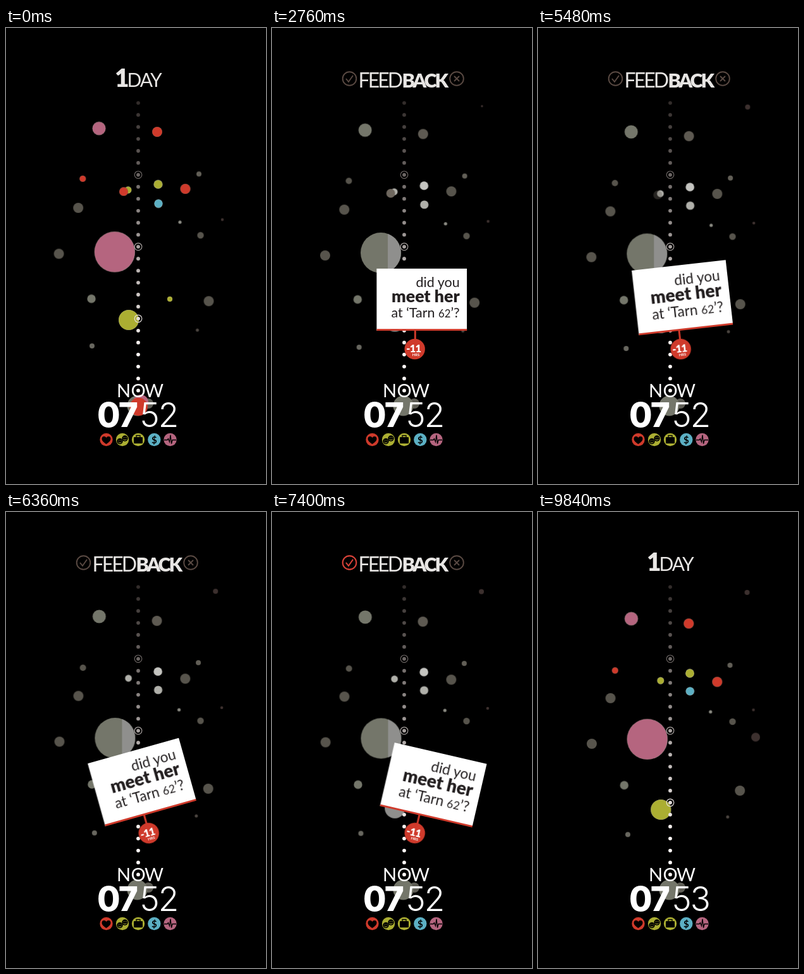
Write an HTML page that moves like this. It is 411 by 720 pixels and loops after 9.88 s.

```html
<!DOCTYPE html>
<html lang="en">
<head>
<meta charset="utf-8">
<title>1 Day</title>
<style>
html, body { margin: 0; width: 100%; height: 100%; overflow: hidden; background: #000; }
svg { display: block; width: 100%; height: 100%; }
text { font-family: Lato, "Open Sans", sans-serif; fill: #fff; }
.mid { text-anchor: middle; }
.light { font-weight: 300; }
.bold { font-weight: 700; }
.black { font-weight: 900; }
.title text { fill: #e8e6e4; }
.clock { font: 300 53px Inter, Roboto, sans-serif; letter-spacing: -2px; }
.clock.heavy { font-weight: 800; }
.card text { fill: #231f20; text-anchor: end; }
.mark { fill: none; stroke: #5a4a43; stroke-width: 1.9; }
.yes { stroke: #dc3d34; }

.anim, .drift, .tint { animation: 9.88s linear infinite; }
.drift { animation-name: drift; }
.tint { animation-name: tint; }
.cool { animation-name: cool; }
.day { animation-name: day; }
.feed { animation-name: feed; }
.glow { animation-name: glow; }
.yes { animation-name: yes; }
.pin, .stem, .tilt { transform-origin: 226px 507px; animation-timing-function: ease-in-out; }
.pin { animation-name: pin; }
.stem { animation-name: stem; }
.tilt { animation-name: tilt; }
.label { animation-name: label; }
.card { animation-name: card; transform-origin: 226px 478px; animation-timing-function: ease-in-out; }
.old { animation-name: old; animation-timing-function: step-end; }
.new { animation-name: new; animation-timing-function: step-end; }
.merge { animation-name: merge; }
.leave { animation-name: leave; }
.arrive { animation-name: arrive; }
.late { animation-name: late; }

@keyframes drift {
  from { transform: translate(var(--x0), var(--y0)); }
  to { transform: translate(var(--x1), var(--y1)); }
}
@keyframes tint { 0%, 9% { opacity: 1; } 21.5%, 80.5% { opacity: 0; } 85%, 100% { opacity: 1; } }
@keyframes cool { 0%, 9% { opacity: 1; } 18%, 100% { opacity: 0; } }
@keyframes day { 0%, 9% { opacity: 1; } 13%, 88% { opacity: 0; } 92%, 100% { opacity: 1; } }
@keyframes feed { 0%, 12% { opacity: 0; } 17%, 86% { opacity: 1; } 90%, 100% { opacity: 0; } }
@keyframes glow {
  0%, 8% { filter: drop-shadow(0 0 0 #cbb0a400); }
  13%, 19% { filter: drop-shadow(0 0 4px #cbb0a4); }
  28%, 86% { filter: drop-shadow(0 0 0 #cbb0a400); }
  91% { filter: drop-shadow(0 0 4px #cbb0a4); }
  98%, 100% { filter: drop-shadow(0 0 0 #cbb0a400); }
}
@keyframes yes { 0%, 67% { opacity: 0; } 70%, 100% { opacity: 1; } }
@keyframes pin {
  0%, 9% { transform: translate(-16px, 91px) scale(.88); }
  16%, 86% { transform: none; }
  91%, 100% { transform: scale(0); }
}
@keyframes label { 0%, 13% { opacity: 0; } 17%, 100% { opacity: 1; } }
@keyframes stem { 0%, 15% { transform: scaleY(0); } 19%, 82% { transform: none; } 88%, 100% { transform: scaleY(0); } }
@keyframes tilt {
  0%, 51% { transform: none; }
  61%, 64.5% { transform: rotate(-15.7deg); }
  72% { transform: rotate(14deg); }
  75% { transform: rotate(13deg); }
  81%, 100% { transform: none; }
}
@keyframes card { 0%, 22% { transform: scale(0); } 29%, 79% { transform: none; } 83%, 100% { transform: scale(0); } }
@keyframes old { 0% { opacity: 1; } 92%, 100% { opacity: 0; } }
@keyframes new { 0% { opacity: 0; } 92%, 100% { opacity: 1; } }
@keyframes merge { 0%, 44% { opacity: 1; } 62%, 100% { opacity: 0; } }
@keyframes leave { 0%, 20% { opacity: 1; } 34%, 100% { opacity: 0; } }
@keyframes arrive { 0%, 24% { transform: scale(0); } 33%, 100% { transform: none; } }
@keyframes late { 0%, 82% { transform: scale(0); } 92%, 100% { transform: none; } }
</style>
</head>
<body>
<svg viewBox="0 0 411 720" xmlns="http://www.w3.org/2000/svg">
  <g id="dots"></g>
  <g id="axis"></g>

  <g class="title">
    <g class="anim glow">
      <g class="anim day">
        <text class="black" x="172" y="93" font-size="39">1</text>
        <text x="191.500" y="93" font-size="30" letter-spacing="-2">DAY</text>
      </g>
      <g class="anim feed">
        <text x="136.500" y="93.500" font-size="32" letter-spacing="-2.900">FEED</text>
        <text class="black" x="205.500" y="93.500" font-size="30.500" letter-spacing="-3">BACK</text>
      </g>
    </g>
    <g class="anim feed">
      <g class="mark">
        <circle cx="122.500" cy="80" r="10.800"/><path d="M117 80l4 5 7-10"/>
        <circle cx="292" cy="80" r="10.800"/><path d="M288 76l8 8m0-8l-8 8"/>
      </g>
      <g class="mark anim yes"><circle cx="122.500" cy="80" r="10.800"/><path d="M117 80l4 5 7-10"/></g>
    </g>
  </g>

  <g class="anim tilt">
    <g class="anim pin">
      <rect class="anim stem" x="224.800" y="477" width="3" height="30" fill="#cf3a2b"/>
      <circle cx="225.700" cy="507" r="16.200" fill="#cf3a2b"/>
      <g class="anim label">
        <text class="mid black" x="223.800" y="511.800" font-size="16.500" letter-spacing="-.8">-11</text>
        <text class="mid bold" x="227.500" y="518.300" font-size="5.800">HRS</text>
      </g>
    </g>
    <g class="anim card">
      <rect x="162.500" y="375" width="149.500" height="103" fill="#fff"/>
      <rect x="162.500" y="475" width="149.500" height="3" fill="#cf3a2b"/>
      <text x="300" y="406" font-size="22.500">did you</text>
      <text class="black" x="300" y="431" font-size="28">meet her</text>
      <text x="300" y="456" font-size="22.500">at ‘Tarn <tspan font-size="17.500">62</tspan>’?</text>
    </g>
  </g>

  <g class="mid" font-size="29">
    <text x="186" y="583">N</text><text x="209" y="583">O</text><text x="234" y="583">W</text>
  </g>
  <text class="clock heavy" x="144" y="629.500">07</text>
  <text class="clock anim old" x="212" y="629.500">52</text>
  <text class="clock anim new" x="212" y="629.500">53</text>

  <g id="icons">
    <circle cx="158.500" cy="650" r="10.200" fill="#cf3a2b"/>
    <path d="M158.500 657c-4-3-7-5-7-8.500c0-4 5-5 7-1.500c2-3.500 7-2.500 7 1.500c0 3.500-3 5.500-7 8.500z"/>
    <circle cx="184" cy="650" r="10.200" fill="#abae32"/>
    <circle cx="180" cy="652.500" r="4.700"/><circle cx="188" cy="648" r="4.700"/>
    <g fill="none" stroke="#abae32">
      <path d="M177.500 653.500q2.500 3.500 5 0M178 651h1.200m2 0h1.200M185.500 649q2.500 3.500 5 0M186 646.500h1.200m2 0h1.200"/>
    </g>
    <circle cx="209" cy="650" r="10.200" fill="#abae32"/>
    <rect x="202" y="646" width="14" height="10" rx="1"/>
    <path d="M206 646v-2.500h6v2.500" fill="none" stroke="#000" stroke-width="1.300"/>
    <circle cx="234.300" cy="650" r="10.200" fill="#5cb0c4"/>
    <text class="mid bold" x="234.300" y="655.500" font-size="15" style="fill:#000">$</text>
    <circle cx="259.500" cy="650" r="10.200" fill="#b5657f"/>
    <path d="M250 650.500h5l1.500-2 2 5 1.500-11 1.500 14 1.500-6h6" fill="none" stroke="#000" stroke-width="1.300"/>
  </g>
</svg>
<script>
const NS = 'http://www.w3.org/2000/svg';
const RED = '#cf3a2b', PINK = '#b5657f', OLIVE = '#abae32', BLUE = '#5cb0c4';
const DIM = '#57544c', SAGE = '#74766a', PALE = '#b0b0aa', DUSK = '#3c302e';

function add(parent, tag, attrs) {
  const el = document.createElementNS(NS, tag);
  for (const k in attrs) el.setAttribute(k, attrs[k]);
  return parent.appendChild(el);
}

// start x, y, end x, y, radius, grey, colour, extra animation
const dots = [
  [147, 158.5, 147.5, 168.5, 10.5, SAGE, PINK],
  [239, 164, 238.3, 176.2, 8, '#5e5a52', RED],
  [121.3, 238, 121.8, 250.3, 5, DIM, RED],
  [305, 230.5, 303.5, 242, 4, '#625f57'],
  [240.5, 246.8, 240, 254.7, 6.8, '#c4c4c0', OLIVE],
  [283.5, 254, 283.3, 268.3, 8, DIM, RED],
  [241, 277.3, 240.3, 283, 6.6, PALE, BLUE],
  [193, 255.7, 193.8, 266.3, 5.4, PALE, OLIVE],
  [186, 258.3, 192, 268, 7, '#6e675e', RED, 'merge'],
  [114.2, 284, 114.6, 294, 8, DIM],
  [83.6, 356.5, 85, 366, 8, DIM],
  [171.8, 353.5, 172.7, 358.8, 32, SAGE, PINK],
  [135, 427.5, 136.3, 431.5, 6.7, SAGE],
  [136, 502, 142, 509.3, 4, '#68675f'],
  [194, 461, 194.3, 470, 16, '#8f8f8d', OLIVE],
  [320.5, 431.3, 319.2, 440, 8, DIM],
  [259, 428, 261, 433, 4, '#c9c27a', OLIVE, 'leave'],
  [307.5, 327.3, 307.5, 331, 5.2, DIM],
  [275, 306.5, 272.7, 315.5, 2.6, '#8a8a82'],
  [342, 302.5, 340.5, 312.5, 2.3, DUSK],
  [302.5, 477, 299.8, 481.5, 2.5, '#4a443f'],
  [332.5, 122, 330.5, 127, 4, DUSK, null, 'arrive'],
  [344.5, 355, 344, 355.5, 7, DUSK, null, 'late']
];

const field = document.getElementById('dots');
for (const [x0, y0, x1, y1, r, grey, colour, extra] of dots) {
  const move = add(field, 'g', {
    class: 'drift',
    style: `--x0:${x0}px;--y0:${y0}px;--x1:${x1}px;--y1:${y1}px`
  });
  const g = add(move, 'g', extra ? { class: 'anim ' + extra } : {});
  add(g, 'circle', { r, fill: grey });
  // lighter side of the largest disc
  if (r > 30) add(g, 'path', { d: 'M11-30A32 32 0 0 1 11 30z', fill: '#8f8f8d' });
  if (colour) add(g, 'circle', { r: r - .2, fill: colour, class: 'tint' });
}

// cluster behind the clock
add(field, 'circle', { cx: 225, cy: 593, r: 8, fill: '#5e5d55' });
add(field, 'circle', { cx: 207.5, cy: 596.5, r: 16, fill: SAGE });
add(field, 'circle', { cx: 213, cy: 591, r: 12, fill: PINK, class: 'anim cool' });

const axis = document.getElementById('axis');
for (let i = 0; i < 25; i++) {
  const v = Math.round(50 + 205 * Math.min(1, i / 21));
  const tone = `rgb(${v},${v - 6},${v - 8})`;
  const at = { cx: 209, cy: 118.3 + i * 18.92 };
  add(axis, 'circle', { ...at, r: 2.9, fill: tone });
  if (i % 6 === 0 && i > 0 && i < 24) {
    add(axis, 'circle', { ...at, r: 5.8, fill: 'none', stroke: tone, 'stroke-width': 1.2 });
  }
}
</script>
</body>
</html>
```
